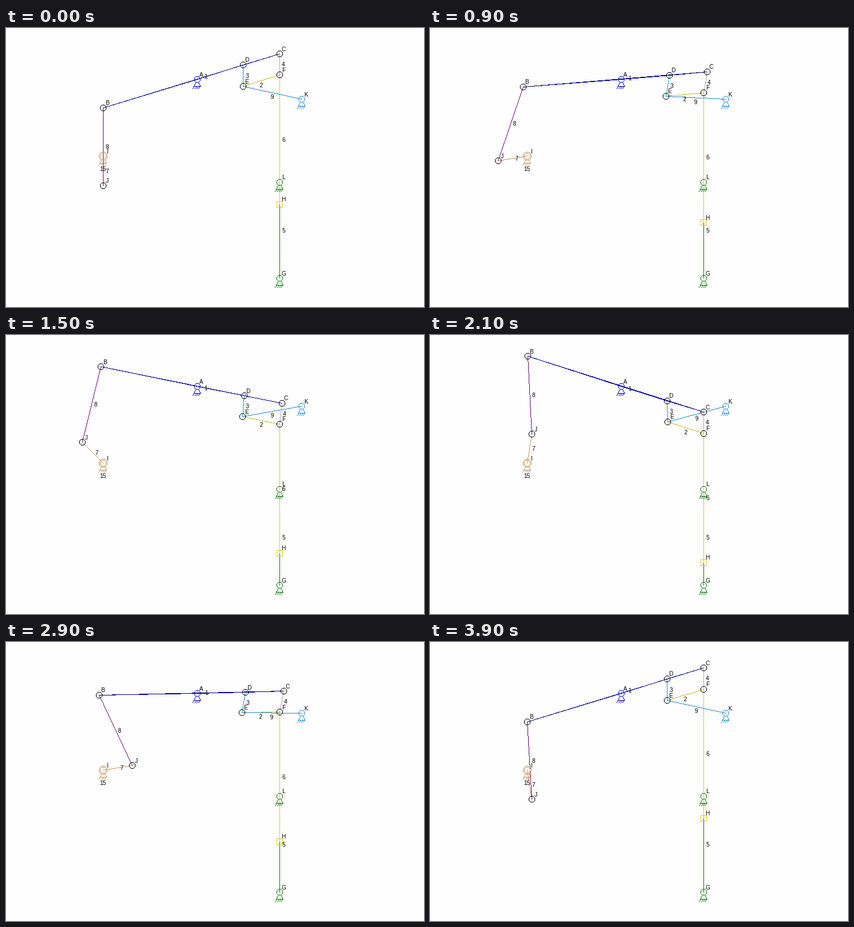
A matplotlib script for the animation above (4000 ms loop, 720x480 px).

```python
import numpy as np
import matplotlib.pyplot as plt
from matplotlib.animation import FuncAnimation
from matplotlib.colors import to_rgb

W, H, DPI = 720, 480, 72
FRAMES, INTERVAL = 40, 100
PAPER, INK = "#fefefe", "#000000"
BLUE, NAVY, SKY, TEAL = "#0000dc", "#000090", "#1e8cd2", "#1e96b4"
GREEN, YELLOW, OLIVE, GOLD = "#007800", "#e0c81e", "#c8b81e", "#f0c020"
TAN, PURPLE, PINK = "#c49a62", "#6c0a78", "#d296b9"

# Fixed pivots and link lengths, in pixels
A = np.array([329.0, 87.5])
I = np.array([167.0, 220.0])
K = np.array([509.0, 122.0])
L = np.array([471.0, 265.0])
G = np.array([471.0, 430.0])
CRANK, COUPLER = 50.7, 133.8
AB, AD, AC = 169.2, 82.9, 148.6
CF, FH = 36.3, 222.5

BARS = [("LG", GREEN), ("FH", YELLOW), ("BA", BLUE), ("AD", BLUE), ("DC", BLUE),
        ("BC", NAVY), ("EF", OLIVE), ("DE", TEAL), ("CF", PINK), ("IJ", TAN),
        ("BJ", PURPLE), ("EK", SKY)]
GROUNDS = [("A", BLUE), ("I", TAN), ("K", SKY), ("L", GREEN), ("G", GREEN)]
# Link number: joints averaged, then the label's shift from that point
LINKS = {"1": ("BADC", 0, 0), "2": ("EF", 0, 8), "3": ("DE", 7, 0),
         "4": ("CF", 7, 0), "5": ("LG", 7, 0), "6": ("FH", 7, 0),
         "7": ("IJ", 7, 0), "8": ("BJ", 7, 0), "9": ("EK", 0, 7.5)}

plt.rcParams["font.family"] = "Liberation Sans"
fig = plt.figure(figsize=(W / DPI, H / DPI), dpi=DPI, facecolor=PAPER)
ax = fig.add_axes([0, 0, 1, 1])
ax.axis("off")
blank = np.full((H, W, 3), to_rgb(PAPER))
canvas = blank.copy()
picture = ax.imshow(canvas, aspect="auto", interpolation="nearest", vmin=0, vmax=1)


def px(p):
    return np.floor(np.asarray(p) + 0.5).astype(int)


def pose(i):
    """Joint positions for one step of the crank."""
    t = 2 * np.pi * i / FRAMES
    J = I + CRANK * np.array([-np.sin(t), np.cos(t)])
    span = J - A
    d = np.hypot(*span)
    u = span / d
    along = (AB**2 - COUPLER**2 + d**2) / (2 * d)
    side = np.sqrt(AB**2 - along**2)
    B = A + along * u + side * np.array([-u[1], u[0]])
    beam = (A - B) / AB
    C, D = A + AC * beam, A + AD * beam
    # F slides on the vertical through G; C, D, E, F form a parallelogram
    F = np.array([471.2, C[1] + np.sqrt(CF**2 - (C[0] - 471.2) ** 2)])
    E = D + F - C
    joints = dict(A=A, B=B, C=C, D=D, E=E, F=F, G=G,
                  H=F + [0, FH], I=I, J=J, K=K, L=L)
    return {name: px(p) for name, p in joints.items()}


def line(p, q, color):
    """One-pixel stroke without smoothing."""
    n = np.abs(np.subtract(q, p)).max() + 1
    x, y = px(np.linspace(p, q, n)).T
    canvas[y, x] = to_rgb(color)


def ring(p, r, color):
    dy, dx = np.mgrid[-r:r + 1, -r:r + 1]
    edge = np.abs(np.hypot(dx, dy) - r) < 0.5
    canvas[p[1] + dy[edge], p[0] + dx[edge]] = to_rgb(color)


def square(p, r, color):
    corners = [p + np.array(c) * r for c in ((-1, -1), (1, -1), (1, 1), (-1, 1))]
    for a, b in zip(corners, corners[1:] + corners[:1]):
        line(a, b, color)


def ground(p, color):
    ring(p, 5, color)
    for s in (-1, 1):
        line(p + [2 * s, 5], p + [6 * s, 12], color)
    line(p + [-6, 12], p + [6, 12], color)
    for k in (-5, -1, 2, 5):
        line(p + [k, 12], p + [k - 3, 16], color)


def text(s):
    return ax.text(0, 0, s, color=INK, fontsize=10, ha="center", va="baseline")


numbers = {s: text(s) for s in LINKS}
letters = {s: text(s) for s in "ABCDEFGHIJKL"}
text("15").set_position((I[0] - 0.5, I[1] + 25))


def update(i):
    p = pose(i)
    canvas[:] = blank
    for (a, b), color in BARS:
        line(p[a], p[b], color)
    for name, color in GROUNDS:
        ground(p[name], color)
    ring(p["I"], 7, TAN)
    for name in "BCDEFJ":
        ring(p[name], 5, INK)
    square(p["H"], 5, GOLD)
    picture.set_data(canvas)

    for name, label in letters.items():
        label.set_position(p[name] + [6.5, -5])
    for s, (names, dx, dy) in LINKS.items():
        mid = np.mean([p[n] for n in names], axis=0)
        numbers[s].set_position(mid + [dx - 0.5, dy + 3.5])
    return [picture, *letters.values(), *numbers.values()]


anim = FuncAnimation(fig, update, frames=FRAMES, interval=INTERVAL,
                     init_func=lambda: update(0), repeat=True, repeat_delay=0)
plt.show()
```
